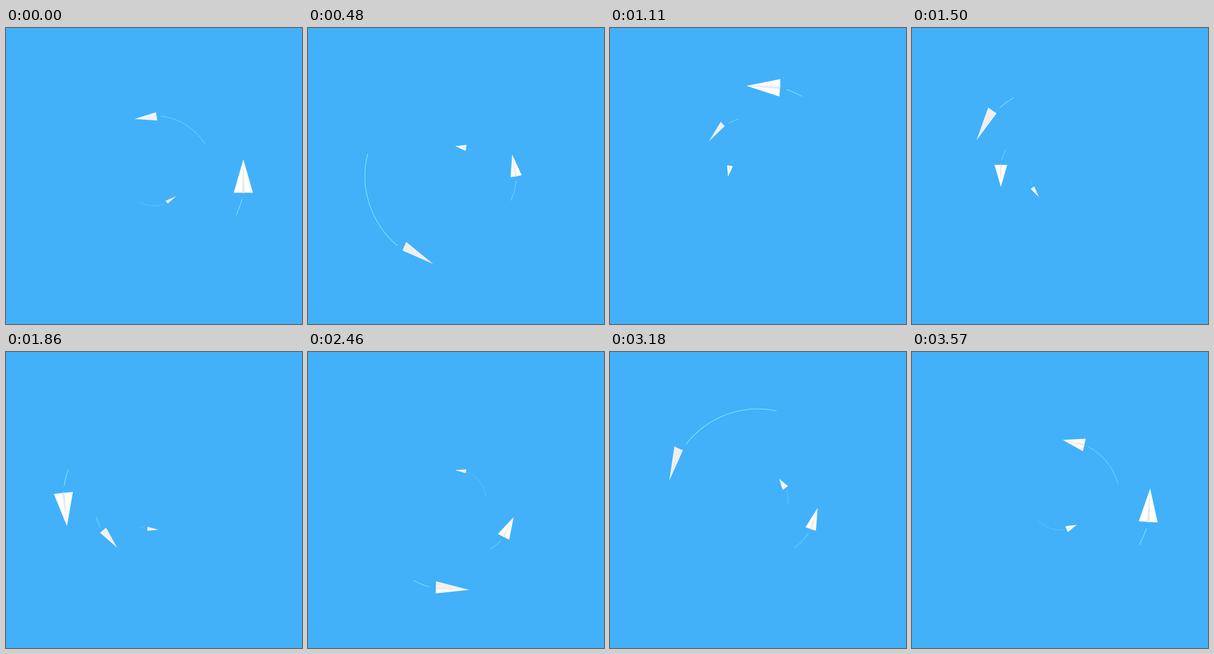
These frames come from a looping animation (500 px wide and 500 px high, 3.6 s). An HTML page with a canvas:

```html
<!DOCTYPE html>
<html lang="en">
<head>
<meta charset="utf-8">
<title>Paper planes</title>
<style>
  html, body { margin: 0; width: 100%; height: 100%; overflow: hidden; background: #42b1f9; }
  canvas { display: block; }
</style>
</head>
<body>
<canvas id="stage" width="500" height="500"></canvas>
<script>
const ctx = document.getElementById('stage').getContext('2d');
const LOOP = 3600, HALF = LOOP / 2, STEP = 30, DEG = Math.PI / 180;

const planes = [
  { scale: 1, lead: 0 },
  { scale: 0.662, lead: 300 },
  { scale: 0.329, lead: 600 },
];

// Roll of a plane: [time in ms, degrees]; level after the last key.
const rollKeys = [[0, 0], [500, -86], [945, 0], [1420, 88], [1850, 0],
                  [2310, -84], [2740, 0], [3220, 87], [3650, 0]];

// cubic-bezier(1/3, 0, 0, 1)
function ease(x) {
  let lo = 0, hi = 1;
  for (let i = 0; i < 30; i++) {
    const s = (lo + hi) / 2;
    if (s * (1 - s) ** 2 + s ** 3 < x) lo = s; else hi = s;
  }
  return lo * lo * (3 - 2 * lo);
}

// Three turns per loop: one steady, two eased; the second half mirrors the first.
function orbit(t) {
  if (t > HALF) return 1080 - orbit(LOOP - t);
  return 360 * (t / LOOP + ease(t / HALF));
}

function trailSpan(t) {
  const u = Math.min(t, LOOP - t);
  return 10.8 + (u < 900 ? 54 * Math.sin(Math.PI * u / 900) ** 2 : 0);
}

function roll(t) {
  const i = rollKeys.findIndex(key => key[0] > t);
  if (i < 0) return 0;
  const [t0, a] = rollKeys[i - 1], [t1, b] = rollKeys[i];
  const x = (t - t0) / (t1 - t0);
  return a + (b - a) * x * x * (3 - 2 * x);
}

function fill(color, ...points) {
  ctx.fillStyle = color;
  ctx.beginPath();
  for (const [x, y] of points) ctx.lineTo(x, y);
  ctx.fill();
}

// Nose points along -y, the outside of the orbit is +x.
function drawBody(angle) {
  const cos = Math.cos(angle * DEG), sin = Math.sin(angle * DEG);
  const nose = [0, -28], wing = 16.2 * cos, fold = 2.3 * cos;
  const keel = [14.4 * sin, 28.8];
  const tone = 255 - 17 * Math.abs(sin);
  fill('#fff', nose, [-wing, 28.3], [wing, 28.3]);
  fill(`rgb(${tone},${tone},${tone + 1})`, nose, [-fold * Math.sign(sin), 28.3], keel);
  fill('#e9e8ec', nose, [-fold, 28.3], [0, 29], [fold, 28.3]);
}

function drawPlane({ scale, lead }, time) {
  const t = (time + lead) % LOOP;
  const head = -14.8, tail = head - trailSpan(t);
  ctx.save();
  ctx.translate(250, 250);
  ctx.scale(scale, scale);
  ctx.rotate(-orbit(t) * DEG);
  ctx.beginPath();
  ctx.arc(0, 0, 153.8, -head * DEG, -tail * DEG);
  ctx.strokeStyle = '#8deaff';
  ctx.lineWidth = 1;
  ctx.stroke();
  ctx.translate(150.9, 0);
  drawBody(roll(time + lead));
  ctx.restore();
}

function draw(now) {
  const time = Math.floor((now + 0.5) / STEP) * STEP % LOOP;
  ctx.fillStyle = '#42b1f9';
  ctx.fillRect(0, 0, 500, 500);
  for (const plane of planes) drawPlane(plane, time);
  requestAnimationFrame(draw);
}
draw(0);
</script>
</body>
</html>
```
